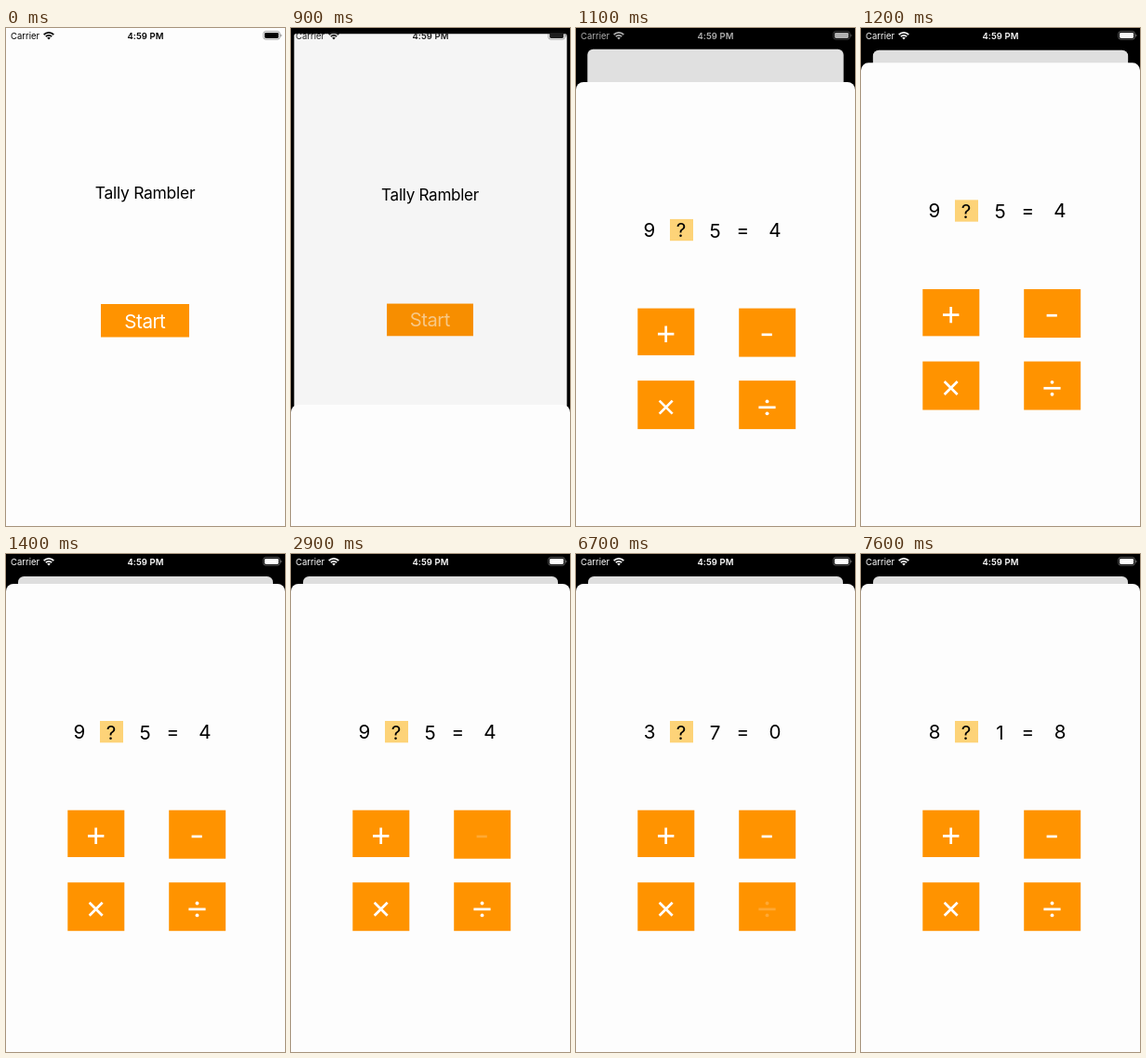
Recreate the animation shown at these times as an HTML page. Size 300 by 534 pixels, loop 8000 ms.

```html
<!DOCTYPE html>
<html lang="en">
<head>
<meta charset="utf-8">
<title>Arithmetic quiz</title>
<style>
  html, body { margin: 0; width: 100%; height: 100%; overflow: hidden; background: #000; }
  svg { display: block; width: 100%; height: 100%; font-family: Inter, Roboto, sans-serif; }
  text { text-anchor: middle; }
  .title { font-size: 17.5px; letter-spacing: -.3px; }
  .start { font-size: 20.6px; letter-spacing: -.5px; fill: #fff; }
  .sum { font-size: 20.6px; }
  .status { font-size: 9.5px; }
  .clock { font-weight: 600; letter-spacing: .1px; }
  .key { fill: #ff9300; }
  .op { stroke: #fff; stroke-width: 2.7; fill: none; }
</style>
</head>
<body>
<svg viewBox="0 0 300 534">
  <rect width="300" height="534"/>

  <g id="home">
    <rect id="homeBack" width="300" height="534" fill="#fdfdfd"/>
    <text class="title" x="149.5" y="183">Tally Rambler</text>
    <rect class="key" x="102" y="296" width="95" height="35.5"/>
    <text id="start" class="start" x="149.3" y="321.5">Start</text>
    <rect id="shade" width="300" height="534"/>
  </g>

  <g id="sheet">
    <path d="M0 534V40a8 8 0 0 1 8-8H292a8 8 0 0 1 8 8V534z" fill="#fdfdfd"/>
    <rect x="101" y="179" width="25" height="23.3" fill="#fdd378"/>
    <g class="sum">
      <text id="left" x="79" y="198"></text>
      <text x="113" y="198.5">?</text>
      <text id="right" x="149.5" y="198.7"></text>
      <text x="179.3" y="198">=</text>
      <text id="result" x="214" y="198"></text>
    </g>
    <g class="key">
      <rect x="66.3" y="274.7" width="61" height="50.3"/>
      <rect x="175.2" y="274.7" width="61" height="52"/>
      <rect x="66.3" y="352.2" width="61" height="52"/>
      <rect x="175.2" y="352.2" width="61" height="52"/>
    </g>
    <path class="op" d="M88 302.3H105.4M96.7 293.6V311"/>
    <path id="minus" class="op" d="M199.6 302.9H210.8"/>
    <path class="op" d="M89.7 373.7L103.7 387.7M103.7 373.7L89.7 387.7"/>
    <g id="divide">
      <path class="op" d="M196.4 380.9H214.6"/>
      <circle cx="205.5" cy="374.5" r="1.9" fill="#fff"/>
      <circle cx="205.5" cy="387.4" r="1.9" fill="#fff"/>
    </g>
  </g>

  <g id="bar" class="status">
    <text x="5" y="11.7" style="text-anchor:start">Carrier</text>
    <g fill="none" stroke="currentColor">
      <path d="M40.7 7.1A7.3 7.3 0 0 1 51.3 7.1" stroke-width="1.8"/>
      <path d="M42.8 9.2A4.4 4.4 0 0 1 49.2 9.2" stroke-width="1.7"/>
    </g>
    <path d="M46 12.4L44.2 10.5A2.6 2.6 0 0 1 47.8 10.5z"/>
    <text class="clock" x="150" y="11.7">4:59 PM</text>
    <rect x="276.8" y="3.6" width="17.6" height="8.6" rx="2.5" fill="none" stroke="currentColor" stroke-width=".8" opacity=".45"/>
    <rect x="278.1" y="4.9" width="15" height="6" rx="1.4"/>
    <path d="M295.4 6.4a1.6 1.6 0 0 1 0 3z" opacity=".5"/>
  </g>
</svg>

<script>
const LOOP = 8000, STEP = 100;
const $ = id => document.getElementById(id);
const clamp = v => Math.min(1, Math.max(0, v));
const set = (id, name, value) => $(id).setAttribute(name, value);

const rounds = [
  { from: 0, left: 9, right: 5, result: 4 },
  { from: 3000, left: 3, right: 7, result: 0 },
  { from: 6900, left: 8, right: 1, result: 8 }
];
const presses = [
  { id: "start", down: 500, up: 770 },
  { id: "minus", down: 2900, up: 3170 },
  { id: "divide", down: 6700, up: 7110 }
];

// Critically damped spring, 0 to 1
function spring(ms) {
  const x = Math.max(0, ms) * 0.0186;
  return 1 - (1 + x) * Math.exp(-x);
}

// A pressed label dims at once and fades back after release
function labelOpacity(t, { down, up }) {
  return t < down ? 1 : 0.2 + 0.8 * clamp((t - up) / 300);
}

function draw(t) {
  const p = t >= 1400 ? 1 : spring(t - 847);

  set("home", "transform", `translate(${13 * p} ${24 * p}) scale(${1 - 26 * p / 300})`);
  set("homeBack", "rx", 7 * p);
  set("shade", "rx", 7 * p);
  set("shade", "opacity", 0.12 * p);
  set("sheet", "transform", `translate(0 ${502 * (1 - p)})`);

  const light = Math.round(255 * clamp((t - 860) / 350));
  const ink = `rgb(${light},${light},${light})`;
  set("bar", "fill", ink);
  set("bar", "color", ink);

  for (const press of presses) set(press.id, "opacity", labelOpacity(t, press));

  const round = rounds.filter(r => r.from <= t).pop();
  for (const id of ["left", "right", "result"]) $(id).textContent = round[id];
}

const begin = performance.now();
function tick() {
  const t = (performance.now() - begin) % LOOP;
  draw(Math.floor(t / STEP) * STEP);
  requestAnimationFrame(tick);
}
tick();
</script>
</body>
</html>
```
